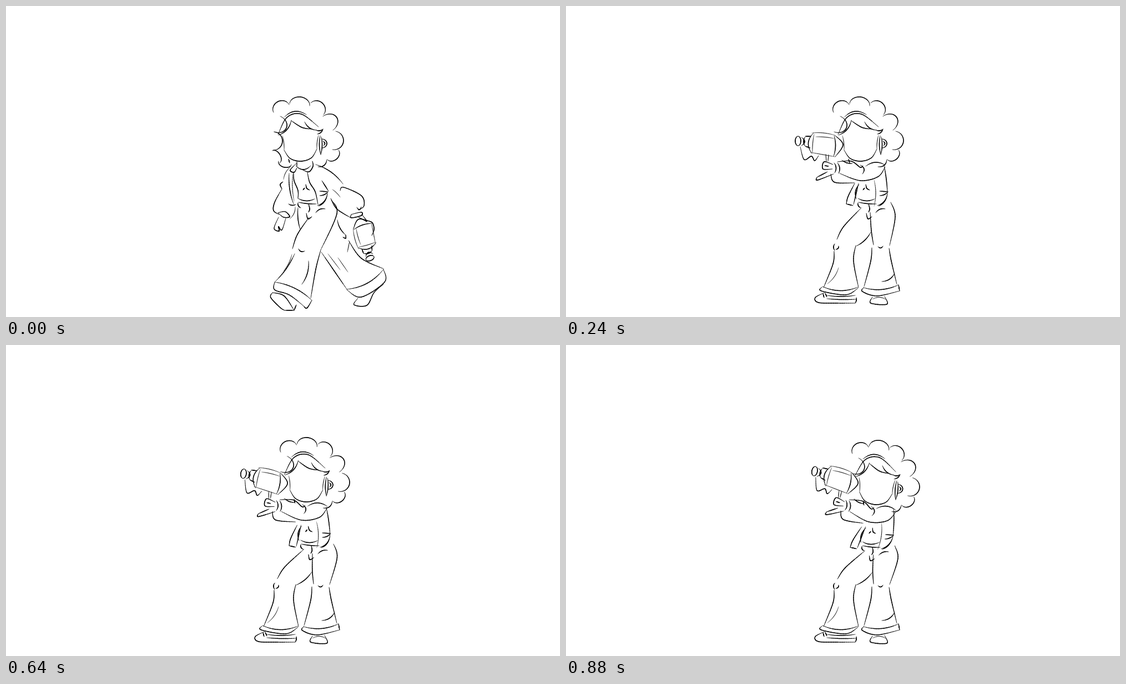
Recreate the animation shown at these times as an HTML page with a canvas. Size 998x561 px, loop 960 ms.

```html
<!DOCTYPE html>
<html lang="en">
<head>
<meta charset="utf-8">
<title>Walk and film</title>
<style>
html, body { margin: 0; width: 100%; height: 100%; overflow: hidden; background: #fff; }
canvas { display: block; }
</style>
</head>
<body>
<canvas id="stage" width="998" height="561"></canvas>
<script>
const ctx = document.getElementById("stage").getContext("2d");
const STEP = 80, STEPS = 12, STILL = [0, 0, 0];
const same = p => p;
let place = same;

// Brush line through a path, heaviest in the middle and tapered at both ends.
function brush(path, count, weight = 1.55) {
  let previous = place(path(0));
  for (let k = 1; k <= count; k++) {
    const next = place(path(k / count));
    ctx.lineWidth = weight * (0.4 + 0.6 * Math.sin(Math.PI * (k - 0.5) / count));
    ctx.beginPath();
    ctx.moveTo(...previous);
    ctx.lineTo(...next);
    ctx.stroke();
    previous = next;
  }
}

// Path from one end to the other, pushed sideways by h along a profile.
function span(x1, y1, x2, y2, h, along, profile) {
  const dx = x2 - x1, dy = y2 - y1, length = Math.hypot(dx, dy);
  return t => {
    const u = along(t), side = h * profile(t) / length;
    return [x1 + dx * u + dy * side, y1 + dy * u - dx * side];
  };
}

const parabola = t => 4 * t * (1 - t);
const bow = (...n) => brush(span(...n, same, parabola), 14);
const fine = (...n) => brush(span(...n, same, parabola), 14, 0.9);
const bump = (...n) => brush(span(...n,
  t => (1 - Math.cos(Math.PI * t)) / 2, t => Math.sin(Math.PI * t)), 20);

function curve(...n) {
  const last = n.length / 2 - 1;
  brush(t => {
    const i = Math.min(last - 1, Math.floor(t * last)), u = t * last - i;
    return [0, 1].map(axis => {
      const [a, b, c, d] = [i - 1, i, i + 1, i + 2].map(k => n[2 * Math.min(last, Math.max(0, k)) + axis]);
      return b + u / 2 * (c - a + u * (2 * a - 5 * b + 4 * c - d + u * (3 * b - a - 3 * c + d)));
    });
  }, last * 9);
}

function withPlace(move, ...parts) {
  place = move;
  parts.forEach(part => part());
  place = same;
}

function hair() {
  bump(494, 199, 483, 227, 18);
  bump(482, 192, 510, 178, 14);
  bump(511, 176, 547, 180, 14);
  bump(549, 175, 572, 196, 14);
  bump(571, 199, 589, 224, 19);
  bump(594, 226, 588, 259, 17);
  bump(599, 260, 579, 277, 10);
  bow(578, 277, 562, 290, 5);
}

function lowerHair() {
  bump(483, 227, 481, 260, 16);
  bump(480, 261, 493, 283, 8);
  bump(491, 280, 514, 286, -8);
}

function face() {
  bow(502, 200, 541, 196, 8);
  curve(490, 232, 506, 201, 532, 195, 563, 218);
  bow(514, 206, 491, 233, 5);
  curve(514, 207, 533, 219, 550, 222);
  bow(538, 209, 560, 224, -4);
  bow(559, 224, 571, 222, -2);
  bow(571, 222, 561, 231, 2);
  fine(498, 234, 501, 260, 1);
  curve(501, 260, 512, 275, 531, 280, 550, 274, 560, 258);
  fine(560, 258, 563, 233, 1);
  bow(566, 234, 567, 268, -2);
  bow(568, 236, 567, 268, 2);
  bump(569, 240, 569, 256, 9);
  bow(571, 244, 572, 252, 3);
  bow(509, 276, 511, 283, 0);
}

function waist() {
  bow(526, 347, 556, 348, -4);
  bow(535, 332, 538, 328, 0);
  curve(540, 322, 542, 329, 547, 332);
  bow(565, 334, 580, 335, 0);
  bow(580, 335, 565, 342, 2);
  bow(579, 337, 561, 360, 5);
  bow(577, 347, 563, 361, 2);
  bow(527, 354, 559, 357, -1);
  bow(526, 355, 531, 364, -2);
  curve(545, 357, 547, 366, 545, 372);
  curve(541, 374, 544, 384, 551, 380);
  bow(558, 373, 575, 366, 3);
}

function openJacket() {
  fine(524, 280, 524, 290, 0);
  bow(522, 288, 549, 288, -7);
  curve(523, 284, 512, 296, 519, 300, 524, 292);
  curve(552, 280, 553, 289, 546, 299, 535, 296);
  bow(510, 302, 518, 357, -3);
  bow(509, 357, 522, 358, -2);
  fine(517, 302, 519, 352, -2);
  curve(518, 301, 519, 315, 526, 333, 526, 347);
  curve(543, 300, 547, 318, 557, 335, 562, 358);
  bow(569, 315, 581, 334, 0);
}

function turnedJacket() {
  bow(573, 288, 579, 337, 1);
  curve(520, 320, 508, 344, 505, 357);
  bow(505, 357, 517, 360, 0);
  bow(527, 320, 518, 358, 0);
  bow(528, 322, 523, 348, -4);
  fine(555, 314, 555, 361, 3);
}

function freeArm() {
  fine(514, 289, 500, 313, -3);
  curve(499, 317, 494, 322, 497, 330);
  curve(497, 330, 484, 354, 482, 369, 492, 376);
  fine(521, 362, 511, 384, 3);
  curve(490, 373, 503, 371, 511, 380, 500, 381, 490, 373);
  curve(491, 381, 483, 401, 492, 406, 491, 398, 497, 404, 504, 383);
}

function carryingArm() {
  bow(558, 286, 607, 321, 5);
  curve(602, 333, 608, 327, 640, 342, 645, 360, 635, 368);
  curve(585, 347, 596, 366, 621, 382);
  fine(588, 331, 602, 345, 1);
  curve(622, 376, 640, 372, 640, 378, 622, 382, 622, 376);
  bow(632, 363, 640, 362, -5);
  curve(635, 381, 645, 386, 650, 388, 641, 376);
}

function aimingArms() {
  bow(483, 283, 484, 301, 3);
  bow(489, 283, 491, 302, 3);
  curve(489, 281, 514, 280, 530, 291, 535, 288);
  bow(497, 278, 516, 284, -2);
  bow(530, 287, 534, 303, 5);
  bow(540, 289, 575, 287, 6);
  curve(493, 302, 530, 315, 562, 308, 575, 290);
  curve(477, 303, 484, 318, 520, 319);
  curve(481, 286, 465, 281, 463, 294, 480, 294);
  bow(466, 288, 473, 289, 0);
  fine(468, 267, 469, 281, 0);
  fine(473, 268, 472, 280, 0);
  bow(471, 299, 452, 309, 0);
  curve(452, 309, 453, 314, 482, 303);
}

function camera() {
  ctx.beginPath();
  [[443, 229], [484, 233], [499, 250], [485, 272], [440, 265]].forEach(p => ctx.lineTo(...place(p)));
  ctx.fill();
  bow(446, 229, 443, 266, -8);
  fine(447, 231, 444, 265, -1);
  fine(443, 229, 484, 233, 2);
  curve(484, 233, 499, 250, 485, 272);
  fine(440, 264, 485, 272, 0);
  bow(483, 234, 482, 271, 3);
  fine(450, 236, 483, 239, 1);
  bump(418, 235, 418, 252, -5);
  bump(418, 252, 418, 235, -5);
  bow(424, 237, 424, 252, 6);
  bow(431, 236, 431, 253, -3);
  bow(431, 235, 441, 235, 0);
  bow(431, 253, 440, 256, 0);
}

const cable = () => curve(422, 254, 429, 277, 442, 271, 448, 279, 455, 270);

function standingLegs() {
  curve(532, 364, 500, 398, 488, 421);
  bow(484, 429, 484, 441, -2);
  bow(486, 439, 491, 433, -2);
  curve(483, 442, 481, 465, 464, 508);
  bow(549, 408, 523, 433, 3);
  curve(522, 432, 518, 460, 527, 508);
  fine(491, 472, 471, 501, 3);
  curve(548, 372, 550, 405, 554, 431);
  curve(585, 354, 593, 380, 583, 432);
  bow(562, 434, 571, 433, -3);
  curve(551, 436, 549, 460, 537, 506);
  curve(582, 437, 586, 460, 596, 502);
  bow(592, 482, 569, 497, 4);
}

function standingFeet() {
  bow(462, 506, 526, 507, -7);
  curve(461, 507, 460, 514, 504, 521, 526, 509);
  curve(466, 517, 449, 526, 455, 535, 490, 536, 521, 536);
  bow(523, 526, 521, 536, 1);
  bow(470, 528, 522, 529, -1);
  bow(470, 522, 521, 522, -2);
  bow(463, 519, 465, 526, 0);
  bow(467, 518, 470, 525, 0);
  bow(536, 508, 599, 503, -6);
  curve(536, 508, 534, 515, 560, 523, 601, 514);
  bow(601, 514, 599, 503, 0);
  curve(552, 525, 549, 536, 578, 538, 574, 524);
  fine(552, 529, 577, 530, 4);
}

function strideFront() {
  bow(526, 364, 530, 403, -2);
  curve(546, 381, 525, 412, 516, 438);
  fine(515, 448, 500, 478, 2);
  bow(520, 447, 485, 497, 3);
  curve(586, 350, 596, 375, 567, 440);
  curve(567, 440, 558, 475, 549, 527);
  bow(527, 438, 538, 442, -3);
  bow(545, 460, 533, 502, 4);
  bow(484, 498, 551, 531, 6);
  curve(484, 498, 484, 512, 510, 521, 536, 541);
  curve(536, 541, 542, 545, 551, 531);
  curve(480, 517, 477, 526, 494, 544, 502, 549);
  bow(502, 549, 519, 549, 0);
  curve(480, 517, 501, 523, 519, 549);
  bow(523, 539, 519, 549, 0);
}

function strideBack() {
  bow(597, 386, 612, 413, -3);
  curve(612, 413, 612, 419, 607, 417);
  curve(617, 423, 640, 455, 680, 474);
  bow(568, 444, 614, 511, 0);
  fine(619, 424, 615, 444, 0);
  fine(580, 447, 602, 476, 0);
  fine(598, 454, 616, 480, 0);
  bow(614, 511, 680, 475, -8);
  curve(680, 475, 682, 498, 640, 525, 614, 512);
  curve(634, 527, 627, 539, 650, 540, 663, 517, 680, 502);
}

function passingLegs() {
  bow(526, 364, 532, 408, -6);
  curve(547, 381, 529, 415, 527, 435);
  bow(533, 442, 518, 479, 2);
  fine(526, 474, 501, 507, 1);
  curve(571, 356, 573, 378, 585, 391);
  bow(583, 450, 607, 500, 1);
  fine(575, 447, 578, 510, 1);
  bow(560, 468, 555, 495, -1);
  fine(564, 468, 557, 493, 1);
  bow(501, 507, 577, 516, 6);
  bow(500, 507, 500, 520, 0);
  curve(500, 520, 540, 522, 570, 529, 577, 517);
  bow(578, 512, 608, 503, -2);
  bow(607, 499, 609, 516, 0);
  bow(575, 523, 609, 517, -2);
  bow(517, 523, 508, 533, 0);
  bow(508, 533, 560, 529, -2);
  fine(520, 524, 558, 525, -2);
  curve(565, 530, 570, 538, 595, 534, 607, 519);
  fine(566, 532, 599, 522, -4);
}

function rigid([dx, dy, degrees], cx, cy, scale = 1) {
  const a = degrees * Math.PI / 180, c = scale * Math.cos(a), s = scale * Math.sin(a);
  return ([x, y]) => [cx + dx + (x - cx) * c - (y - cy) * s, cy + dy + (x - cx) * s + (y - cy) * c];
}

const mix = (a, b, k) => a.map((v, i) => v + (b[i] - v) * k);

// The torso leans from shoulder to hip; the legs stay planted below the knee.
function bend(shoulder, hip) {
  const clamp = v => Math.min(1, Math.max(0, v));
  return ([x, y]) => {
    const [dx, dy] = y < 357
      ? mix(shoulder, hip, clamp((y - 290) / 67))
      : mix(hip, STILL, clamp((y - 357) / 75));
    return [x + dx, y + dy];
  };
}

// Offset and turn of each part: [dx, dy, degrees].
const pose = (head, lens, arm, shoulder, hip) => ({ head, lens, arm, shoulder, hip });
const raising = pose(STILL, [-10, 61, -30], [0, 0, -30], STILL, STILL);
const level = pose(STILL, STILL, STILL, STILL, STILL);
const left = pose([-8, 6, -17], [-19, 12, -12], [-8, 1, -5], [-8, 3, 0], [0, 1, 0]);
const centre = pose([11, 3, 2], [9, -6, 8], [3, 3, 4], [4, 5, 0], [5, 5, 0]);
const right = pose([20, 4, 5], [23.5, -17, 11], [12, 5, 9], [11, 2, 0], [5, 6, 0]);
const settled = pose([29, 8, 5], [28.5, -8.5, 11], [18, 9, 9], [17, 8, 0], [7, 8, 0]);

const between = (a, b) => Object.fromEntries(Object.keys(a).map(key => [key, mix(a[key], b[key], 0.5)]));
const aims = [raising, level, between(level, left), left, left,
  between(left, centre), centre, between(centre, right), right, settled];

function drawWalk(passing) {
  withPlace(same, hair, lowerHair, face, openJacket, waist);
  if (passing) withPlace(same, passingLegs);
  else withPlace(same, strideFront, strideBack);
  withPlace(rigid([0, 0, passing ? 10.5 : 0], 503, 312), freeArm);
  withPlace(passing ? rigid([112, 179, -78], 457, 247, 0.92) : rigid([189, 174, -111], 457, 247, 0.9), camera);
  withPlace(rigid([0, 0, passing ? 20 : 0], 575, 291), carryingArm);
  if (passing) curve(608, 406, 597, 437, 603, 443, 612, 413, 608, 406);
  else curve(651, 387, 660, 391, 663, 403, 659, 414);
}

function drawAim(p) {
  const head = rigid(p.head, 531, 245);
  withPlace(head, hair, face);
  if (p === raising) withPlace(head, lowerHair);
  withPlace(bend(p.shoulder, p.hip), turnedJacket, waist, standingLegs, standingFeet);
  withPlace(rigid(p.lens, 457, 247), camera, cable);
  withPlace(rigid(p.arm, 560, 297), aimingArms);
}

function render() {
  const step = Math.floor(performance.now() / STEP) % STEPS;
  ctx.fillStyle = "#fff";
  ctx.fillRect(0, 0, 998, 561);
  ctx.strokeStyle = "#000";
  ctx.lineCap = "round";
  if (step < 2) drawWalk(step === 1);
  else drawAim(aims[step - 2]);
  requestAnimationFrame(render);
}
render();
</script>
</body>
</html>
```
